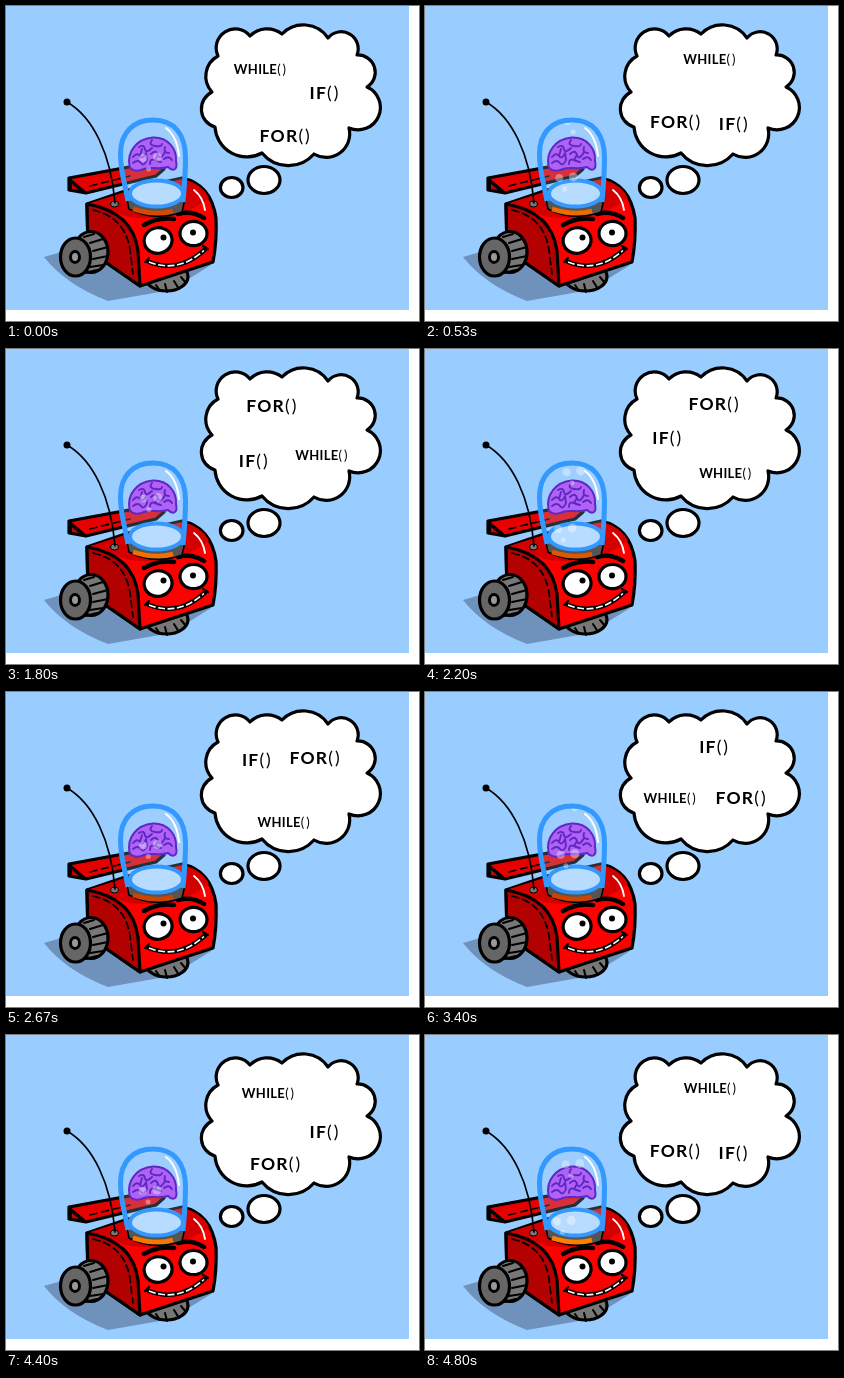
Animation, 413 px wide and 315 px high, one loop 4.87 s. Source, as an HTML page:

```html
<!DOCTYPE html>
<html lang="en">
<head>
<meta charset="utf-8">
<title>Thinking robot car</title>
<style>
  html, body { margin: 0; width: 100%; height: 100%; overflow: hidden; background: #fff; }
  svg { display: block; }
  .ink { stroke: #000; stroke-width: 3.2; stroke-linejoin: round; stroke-linecap: round; }
  .line { fill: none; stroke: #000; stroke-linecap: round; stroke-linejoin: round; }
  text { font-family: Lato, "Open Sans", sans-serif; font-weight: 700; text-anchor: middle; }
  .call { font-weight: 400; letter-spacing: 2px; }
</style>
</head>
<body>
<svg width="413" height="315" viewBox="0 0 413 315">
  <defs>
    <path id="glass" d="M122 195C119 178 114.500 166 114.500 148C114.500 126 128 114 147 114C168 114 179.500 128 179.500 152C179.500 170 178 184 177 196"/>
    <clipPath id="inGlass"><use href="#glass"/><ellipse cx="150" cy="188" rx="27" ry="13"/></clipPath>
  </defs>
  <rect width="403" height="304" fill="#99ccff"/>

  <!-- thought cloud -->
  <path class="ink" fill="#fff" d="M212 50A19 19 0 0 1 244 30A24 24 0 0 1 276 28A29.700 29.700 0 0 1 322 32A17 17 0 0 1 351 49A17.300 17.300 0 0 1 361 81A22.200 22.200 0 0 1 343 122A23.600 23.600 0 0 1 308 148A34 34 0 0 1 256 147A31.800 31.800 0 0 1 209 121A18.800 18.800 0 0 1 206 86A23 23 0 0 1 212 50Z"/>
  <ellipse class="ink" cx="258" cy="174" rx="16" ry="13.500" fill="#fff"/>
  <ellipse class="ink" cx="225.700" cy="181.500" rx="11.300" ry="10" fill="#fff"/>
  <g id="words"></g>

  <!-- shadow and far wheel -->
  <path d="M38 251Q60 279 102 295L165 284L205 259L90 236Z" fill="#6f92bd"/>
  <ellipse class="ink" cx="160.500" cy="270.500" rx="21.500" ry="14.500" fill="#777"/>
  <path class="line" stroke-width="2" d="M150 279L154 285M159 278L161 286M168 275L173 283M175 271L180 277"/>

  <!-- spoiler -->
  <path class="ink" fill="#e60000" d="M63 172L150 156L158 163L150 170L80 187L63 184Z"/>
  <path d="M63 171L82 187L63 184Z"/>
  <path fill="#c00" d="M66 178L73 184L66 183Z"/>
  <path class="line" stroke-width="1.600" stroke-dasharray="7 5" d="M84 180L124 170"/>

  <!-- body -->
  <path class="ink" fill="#f00" d="M81 198L122 184L176 172Q205 178 210 212Q211 235 207 256L134 280L82 244Z"/>
  <path fill="#d40000" d="M81 198L122 185L177 173Q196 178 203 192Q178 212 140 212Q120 212 112 207Z"/>
  <path class="ink" fill="#b30000" d="M81 198Q127 206 132 245L134 280L82 244Z"/>
  <path class="line" stroke-width="1.700" stroke-dasharray="7 4" d="M87 204Q119 211 124 244L127 268"/>
  <path fill="none" stroke="#fff" stroke-width="1.800" stroke-linecap="round" d="M188 184Q197 191 199 204"/>

  <!-- near wheel -->
  <ellipse class="ink" cx="85" cy="246" rx="17" ry="20.500" fill="#777"/>
  <path class="line" stroke-width="2" d="M78 231L88 228M84 237L97 233M87 245L102 241M87 253L102 250M84 261L97 259M79 267L91 264"/>
  <ellipse class="ink" cx="69.500" cy="251" rx="15" ry="19" fill="#666"/>
  <ellipse cx="69" cy="251" rx="4.500" ry="5.500" fill="#999" stroke="#000" stroke-width="3"/>

  <!-- antenna -->
  <ellipse cx="108.500" cy="198" rx="4" ry="3" fill="#777" stroke="#000"/>
  <path class="line" stroke-width="1.700" d="M61 96C87 111 105 148 109 197"/>
  <circle cx="61" cy="96" r="3.500"/>

  <!-- face -->
  <ellipse class="ink" cx="152" cy="234.500" rx="14" ry="12.800" fill="#fff" transform="rotate(-12 152 234)"/>
  <ellipse class="ink" cx="187.500" cy="227.500" rx="13.500" ry="12.200" fill="#fff"/>
  <circle cx="157.500" cy="231.500" r="3"/>
  <circle cx="187" cy="226.500" r="3"/>
  <path class="line" stroke-width="4.500" d="M138 219Q152 211 168 213M172 208Q186 204 198 212"/>
  <path class="line" stroke-width="4.600" d="M142 255.500Q172 268 199 243.500"/>
  <path fill="none" stroke="#fff" stroke-width="1.600" stroke-dasharray="7 2.500" d="M143 256Q172 267.500 198 244.500"/>
  <path class="line" stroke-width="2.200" d="M139 256L143 252M197 240L202 243"/>

  <!-- dome -->
  <path fill="#555" stroke="#000" stroke-width="1.500" stroke-linejoin="round" d="M121 193L123 203Q148 216 176 206L179 193Z"/>
  <path id="ring" fill="none" stroke-width="4.500" d="M127 203Q149 210 167 205"/>
  <use href="#glass" fill="#a8d6ff" fill-opacity=".22"/>
  <ellipse cx="150.500" cy="187.500" rx="26.500" ry="13" fill="#b8dcff" stroke="#39f" stroke-width="4"/>
  <path fill="#b062f5" stroke="#5f28c4" stroke-width="2" d="M123.500 160C121 146 130 133 147 131.500C162 131 171 143 170 155C172 164 167 166 162 161C152 164 145 160 138 163C132 166 125 165 123.500 160Z"/>
  <path fill="none" stroke="#5f28c4" stroke-width="1.900" stroke-linecap="round" stroke-linejoin="round" d="M127 151Q131 146 134 150T140 147M133 141Q138 138 139 143T146 142M146 134Q142 139 149 140T156 138M127 157Q132 153 135 157T141 154M145 148Q150 143 152 149T159 146M144 158Q144 152 149 154T155 156M159 141Q157 147 163 147M158 153Q163 149 166 154M136 143L134 150M152 149L149 154M140 147L141 154"/>
  <g id="bubbles" fill="#fff" fill-opacity=".36" clip-path="url(#inGlass)"></g>
  <use href="#glass" fill="none" stroke="#39f" stroke-width="5"/>
  <path fill="none" stroke="#fff" stroke-width="2" stroke-linecap="round" d="M160 122Q171 130 173 150"/>
</svg>
<script>
const LOOP = 4870, TICK = 1000 / 15;
const SPIN = 7.07, RISE = 5.3, GAP = 57, DRIFT = 0.15;
const byId = id => document.getElementById(id);

function add(parent, tag, attrs) {
  const el = document.createElementNS("http://www.w3.org/2000/svg", tag);
  for (const name in attrs) el.setAttribute(name, attrs[name]);
  return parent.appendChild(el);
}

// keyword, start angle, font size, letter spacing
const words = [
  ["WHILE", 227.2, 13, 0.3],
  ["IF", -6.9, 17.5, 1.2],
  ["FOR", 92, 17.5, 1.2]
].map(([label, angle, size, gap]) => {
  const el = add(byId("words"), "text", { "font-size": size, "letter-spacing": gap });
  el.textContent = label;
  add(el, "tspan", { class: "call" }).textContent = "()";
  return { el, angle, drop: size * 0.34 };
});

// x at the bottom, height offset, radius; each repeats up the dome
const bubbles = [];
for (const [x, dy, r] of [[132, 0, 4], [146, -1, 4.5], [139, 11, 2.5]]) {
  for (let row = 0; row < 3; row++) {
    bubbles.push({ el: add(byId("bubbles"), "circle", { r }), x, dy: dy + row * GAP });
  }
}

// Twelve poses a second, shown on a fifteen-per-second clock.
function poseAt(ms) {
  const n = Math.floor((ms + 4) / TICK), q = n % 15;
  return 12 * Math.floor(n / 15) + q - (q >= 4) - (q >= 9);
}

function draw(pose) {
  for (const { el, angle, drop } of words) {
    const a = (angle + SPIN * pose) * Math.PI / 180;
    el.setAttribute("x", (281 + 38.3 * Math.cos(a)).toFixed(2));
    el.setAttribute("y", (92 + 38.3 * Math.sin(a) + drop).toFixed(2));
  }
  const top = 95 + GAP - (RISE * pose) % GAP;
  for (const { el, x, dy } of bubbles) {
    const y = top + dy;
    el.setAttribute("cx", x + DRIFT * (187 - y));
    el.setAttribute("cy", y);
  }
  const glow = (1 + Math.cos((pose - 15) / 43 * 2 * Math.PI)) / 2;
  byId("ring").setAttribute("stroke", `rgb(${200 + 55 * glow},${60 + 68 * glow},0)`);
}

const start = performance.now();
function loop() {
  draw(poseAt((performance.now() - start) % LOOP));
  requestAnimationFrame(loop);
}
loop();
</script>
</body>
</html>
```
